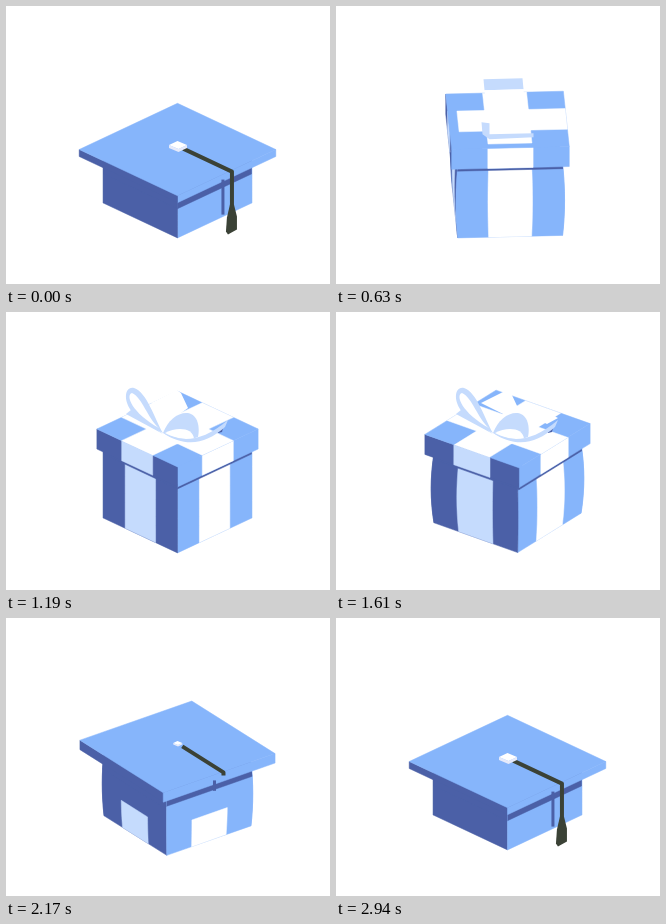
An HTML page with a canvas that plays this animation: 324 by 278 pixels, repeating every 3.01 s.

```html
<!DOCTYPE html>
<html lang="en">
<head>
<meta charset="utf-8">
<title>Cap and gift</title>
<style>
  html, body { margin: 0; width: 100%; height: 100%; overflow: hidden; background: #fff; }
  canvas { display: block; }
</style>
</head>
<body>
<canvas id="stage" width="324" height="278"></canvas>
<script>
const LOOP = 3010, STEP = 70;
const CX = 171.5, TILT = 0.47;
const DARK = [75, 96, 167], LIGHT = [134, 181, 251];
const PALE = [197, 219, 253], WHITE = [255, 255, 255];
const CORD = '#3b4236';
const ctx = document.getElementById('stage').getContext('2d');

const rad = d => d * Math.PI / 180;
const sin = d => Math.sin(rad(d)), cos = d => Math.cos(rad(d));
const clamp = v => Math.max(0, Math.min(1, v));
const lerp = (a, b, f) => a + (b - a) * f;
const mix = (a, b, f) => `rgb(${a.map((v, i) => Math.round(lerp(v, b[i], f)))})`;
const rgb = c => mix(c, c, 0);

// Timing: smooth step, smooth bump, and a value that rises and later falls.
const ease = (t, from, to) => (1 - cos(180 * clamp((t - from) / (to - from)))) / 2;
const bump = (t, mid, half) => Math.abs(t - mid) < half ? cos(90 * (t - mid) / half) ** 2 : 0;
const rise = (t, a, b, c, d) => ease(t, a, b) - ease(t, c, d);

function pose(t) {
  const gift = rise(t, 310, 630, 1820, 2310);
  const hop = bump(t, 400, 230), hopBack = bump(t, 1930, 220);
  const air = hop + hopBack;
  const squash = bump(t, 140, 140) + bump(t, 650, 130) + bump(t, 1610, 140) + bump(t, 2240, 170);
  const stretch = 63 * bump(t, 370, 300) + 36 * bump(t, 1980, 330) + 4 * bump(t, 2520, 200);
  const base = lerp(197, 206, gift) - 21 * hop - 14 * hopBack + 8 * squash * (1 - gift);
  const neck = 105 - 14 * air;
  return {
    yaw: 45 - 180 * ease(t, 98, 882) - 90 * ease(t, 1435, 2350),
    base,
    lid: lerp(139, 114, gift) + squash * lerp(9, 4, gift),
    lidY: base - lerp(53.5, 89, gift) - stretch,
    rim: lerp(7, 20, gift),
    taper: 1 - 0.09 * air * gift,
    top: neck,
    mid: neck + 8 * squash,
    foot: 105,
    shade: lerp(6, 2, gift) + 10 * air,
    strip: rise(t, 210, 450, 1890, 2400),
    arms: [0, 1, 2, 3].map(k => {
      const late = k > 1 ? 60 : 0, last = k % 3 ? 0 : 140;
      return rise(t, 400 + late, 630 + late, 1750 + last, 1890 + last);
    }),
    bow: rise(t, 560, 1000, 1610, 1820),
    cord: 1 - rise(t, 140, 280, 2030, 2170),
    drop: 1 - rise(t, 70, 210, 2120, 2380),
    knob: 1 - rise(t, 140, 350, 2030, 2310)
  };
}

function trace(pts) {
  ctx.beginPath();
  pts.forEach(p => ctx.lineTo(p[0], p[1]));
  ctx.closePath();
}

// The thin outline closes seams between neighbouring faces.
function poly(pts, fill) {
  trace(pts);
  ctx.fillStyle = ctx.strokeStyle = fill;
  ctx.lineWidth = 0.5;
  ctx.fill();
  ctx.stroke();
}

function path(d, fill) {
  ctx.fillStyle = fill;
  ctx.fill(new Path2D(d));
}

function rect(x, y, w, h, fill) {
  ctx.fillStyle = fill;
  ctx.fillRect(x, y, w, h);
}

// Ground plane point, out along angle n and u sideways.
const place = (n, out, u, y) => [
  CX + out * cos(n) - u * sin(n),
  y + TILT * (out * sin(n) + u * cos(n))
];

const square = (p, w, y) =>
  [0, 90, 180, 270].map(a => place(p.yaw + a, w / 2, w / 2, y));

function bodyFace(p, n, half, from) {
  const roof = p.lidY + p.rim, left = [], right = [];
  for (let i = 0; i <= 8; i++) {
    const v = lerp(from, 1, i / 8), r = 1 - v;
    const w = (r * r * p.top + 2 * r * v * p.mid + v * v * p.foot) / 2;
    const y = lerp(roof, p.base, v);
    left.push(place(n, w, w * half, y));
    right.unshift(place(n, w, -w * half, y));
  }
  return left.concat(right);
}

function lidFace(p, n, half) {
  const w = p.lid / 2, b = w * p.taper, y = p.lidY;
  return [place(n, w, -w * half, y), place(n, w, w * half, y),
    place(n, b, b * half, y + p.rim), place(n, b, -b * half, y + p.rim)];
}

const darkness = n => clamp(-2 * cos(n) - 0.12);

function drawBody(p, faces) {
  for (const { n } of faces) {
    const d = darkness(n), side = bodyFace(p, n, 1, 0);
    poly(side, mix(LIGHT, DARK, d));
    if (p.strip > 0) poly(bodyFace(p, n, 0.41, 1 - p.strip), mix(WHITE, PALE, d));
    if (sin(n) < 0.1) continue;
    ctx.save();
    trace(side);
    ctx.clip();
    poly(square(p, p.lid * p.taper, p.lidY + p.rim + p.shade), rgb(DARK));
    ctx.restore();
  }
}

function drawLid(p, faces) {
  for (const { n, arm } of faces) {
    if (sin(n) <= 0) continue;
    const d = darkness(n);
    poly(lidFace(p, n, 1), mix(LIGHT, DARK, d));
    if (arm > 0.5) poly(lidFace(p, n, 0.385), mix(WHITE, PALE, d));
  }
  poly(square(p, p.lid, p.lidY), rgb(LIGHT));
  const w = 22;
  for (const { n, arm } of faces) {
    if (arm < 0.05) continue;
    const end = Math.max(w, arm * p.lid / 2);
    poly([place(n, -w, -w, p.lidY), place(n, -w, w, p.lidY),
      place(n, end, w, p.lidY), place(n, end, -w, p.lidY)], '#fff');
  }
}

// Folded ribbon that stands up just before the bow opens.
function drawFold(p) {
  ctx.save();
  ctx.translate(CX, p.lidY);
  path('M-24 -41L15 -42L16 -31L-23 -30Z', rgb(PALE));
  path('M-23 -30L16 -31L19 14L-18 15Z', '#fff');
  path('M-26 2L-18 3L-18 14L26 13L26 17L-18 19L-25 14Z', rgb(PALE));
  ctx.restore();
}

function drawBow(p) {
  const pale = rgb(PALE);
  ctx.save();
  ctx.translate(CX, p.lidY);
  ctx.scale(p.bow, p.bow);
  ctx.translate(-CX, -117);
  path('M145 91L171 78L175 81L182 96L171 104Z', '#fff');
  path('M195 92L222 106L211 112L182 98Z', '#fff');
  path('M210 118L217 116L216 120L212 121Z', rgb(DARK));
  path('M125 98L120 102L157 122Z', pale);
  path('M157 121C149 108 141 80 128 76C118 74 117 90 127 101C136 110 148 117 157 121Z', pale);
  path('M153 116C142 107 136 85 126 81C119 83 126 101 153 116Z', '#fff');
  path('M157 121C162 108 172 100 182 101C192 103 194 115 192 125C180 130 165 126 157 121Z', pale);
  path('M159 121C170 115 187 115 188 127C178 128 166 125 159 121Z', '#fff');
  path('M157 121C175 130 195 131 222 108L219 115C200 132 180 136 157 121Z', pale);
  ctx.restore();
}

function drawTassel(p, n) {
  const y = p.lidY - 3.5;
  const [x, tipY] = place(n, 8 + 69 * p.cord, 0, y);
  if (p.drop > 0) rect(x - 10.5, tipY + 8, 3, 8 + 27 * p.drop, rgb(DARK));
  if (p.cord > 0) {
    ctx.strokeStyle = CORD;
    ctx.lineWidth = 4;
    ctx.lineJoin = 'round';
    ctx.beginPath();
    ctx.moveTo(...place(n, 8, 0, y));
    ctx.lineTo(x, tipY);
    ctx.lineTo(x, tipY + 36 * p.drop);
    ctx.stroke();
  }
  if (p.drop > 0.3) {
    ctx.save();
    ctx.translate(x, tipY + 33 * p.drop);
    ctx.scale(1, p.drop);
    path('M-2 0L2 0L5 12L5 25L-4 30L-6 27L-5 13Z', CORD);
    ctx.restore();
  }
  if (p.knob > 0) {
    ctx.save();
    ctx.translate(CX, y);
    ctx.scale(p.knob, p.knob);
    path('M-8.5 -1L1 3L9.5 -1L9.5 2L1 6L-8.5 2Z', '#e6eafa');
    path('M0 -5L9.5 -1L1 3L-8.5 -1Z', '#fff');
    ctx.restore();
  }
}

function draw(t) {
  const p = pose(t);
  const faces = p.arms
    .map((arm, k) => ({ n: p.yaw + 90 * k, arm }))
    .sort((a, b) => sin(a.n) - sin(b.n));

  rect(0, 0, 324, 278, '#fff');
  drawBody(p, faces);
  drawLid(p, faces);
  if (p.bow > 0.2) drawBow(p);
  else if (p.bow > 0.01) drawFold(p);
  drawTassel(p, t < LOOP / 2 ? p.yaw : p.yaw + 270);
}

const begin = performance.now();
function tick() {
  const t = (performance.now() - begin) % LOOP;
  draw(Math.floor(t / STEP) * STEP);
  requestAnimationFrame(tick);
}
tick();
</script>
</body>
</html>
```
